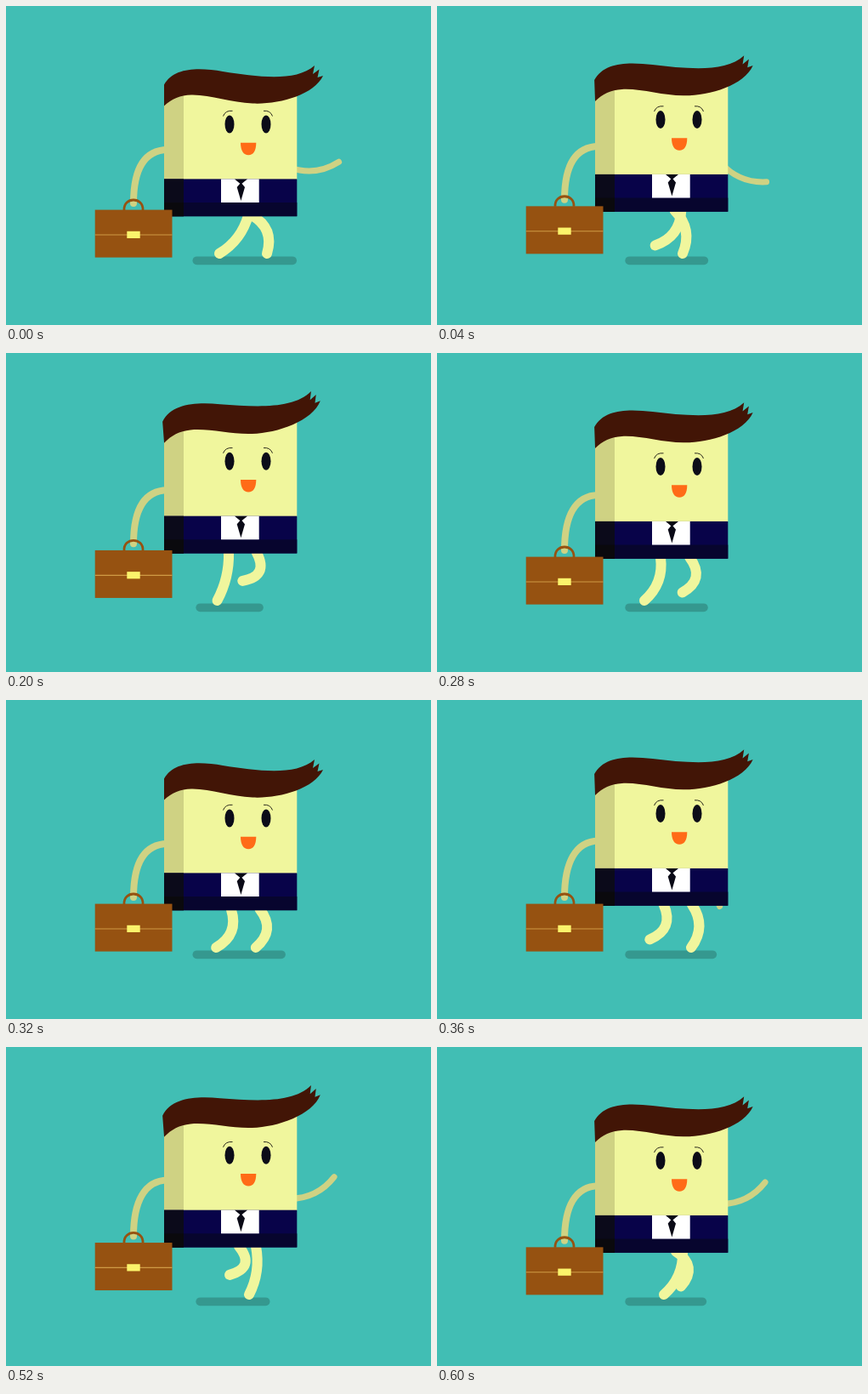
An HTML page for the animation above (0.64 s loop, 500 by 375 pixels).

```html
<!DOCTYPE html>
<html lang="en">
<head>
<meta charset="utf-8">
<title>Walking businessman</title>
<style>
  html, body { margin: 0; width: 100%; height: 100%; overflow: hidden; background: #41beb4; }
  svg { display: block; width: 100vw; height: 100vh; }
  .limb { fill: none; stroke-linecap: round; }
  .leg { stroke: #f0f69d; stroke-width: 12; }
  .arm { stroke: #cfd283; stroke-width: 8; }
</style>
</head>
<body>
<svg viewBox="0 0 500 375">
  <rect width="500" height="375" fill="#41beb4"/>
  <rect id="shadow" y="294.4" height="9.8" rx="4.9" fill="#35988f"/>
  <path id="legA" class="limb leg"/>
  <path id="legB" class="limb leg"/>
  <path id="armBack" class="limb arm"/>
  <path id="armFront" class="limb arm" style="stroke-width:7"/>

  <g id="body">
    <rect x="186" y="92" width="156.3" height="112" fill="#f0f69d"/>
    <rect x="186" y="92" width="23" height="112" fill="#cfd283"/>
    <rect x="186" y="203.4" width="156.3" height="43.8" fill="#080349"/>
    <rect x="186" y="231" width="156.3" height="16.2" fill="#07052e"/>
    <rect x="186" y="203.4" width="23" height="43.8" fill="#0b0a1a"/>
    <rect x="186" y="231" width="23" height="16.2" fill="#0a090d"/>
    <rect x="253" y="203.4" width="44.7" height="27.6" fill="#fff"/>
    <path d="M269 203.4H284L277.5 208.7L281 213L276.4 229L271.7 213L275.3 208.7Z" fill="#0a0a16"/>
    <g fill="#0c0c18">
      <ellipse cx="263" cy="139" rx="5.5" ry="10.5"/>
      <ellipse cx="306" cy="139" rx="5.5" ry="10.5"/>
    </g>
    <path d="M255.5 129.5Q258 122.5 266.5 123.3M303 123.3Q311 122.5 313.5 129.5" fill="none" stroke="#2b2a1c"/>
    <path d="M276 160.7H294.3C294.3 170 291 175.3 285.2 175.3C279.5 175.3 276 170 276 160.7Z" fill="#ff6b17"/>
    <path id="hair" fill="#421506" d="M186 117.5V92.5C198 71.5 228 72.5 255 77C295 83 340 90 363 70L361 80L368.5 74.5L366.5 84L373 82C362 105 320 116 290 114.5C265 113.5 240 104 218 104.5C205 105 195 109 186 117.5Z"/>
  </g>

  <g id="bag">
    <path d="M139 240C138 224 162 224 161 240" fill="none" stroke="#965211" stroke-width="2.8"/>
    <rect x="104.7" y="239.6" width="90.8" height="56" fill="#965211"/>
    <path d="M104.7 269H195.5" stroke="#cf9a45" stroke-width="1.2"/>
    <rect x="142.3" y="264.8" width="15.4" height="8.2" fill="#fbf36b"/>
  </g>
</svg>
<script>
const STEP = 40, STEPS = 16, GROUND = 291;
const LEG = 60, ARM = 58;
const el = id => document.getElementById(id);
const { sin, cos, max, sqrt, hypot, PI } = Math;

// Key poses: step, hip x, foot x.
const strideA = [[0, 289, 307], [3, 261, 253], [7, 263, 244], [13, 274, 263], [15, 281, 287]];
const strideB = [[0, 285, 251], [3, 292, 268], [9, 300, 299], [13, 294, 286], [15, 289, 267]];

function pose(keys, step) {
  const n = keys.findLastIndex(k => k[0] <= step);
  const from = keys[n], to = keys[n + 1] || keys[0];
  const end = n + 1 < keys.length ? to[0] : STEPS;
  const part = (step - from[0]) / (end - from[0]);
  return [1, 2].map(i => from[i] + (to[i] - from[i]) * part);
}

function curve(id, type, ...p) {
  el(id).setAttribute('d', `M${p[0]} ${p[1]}${type}${p.slice(2).join(' ')}`);
}

function move(id, value) {
  el(id).setAttribute('transform', value);
}

// The closer the foot comes to the hip, the further the knee bends forward.
function drawLeg(id, hipX, hipY, footX, footY) {
  const dx = footX - hipX, dy = footY - hipY, d = hypot(dx, dy);
  const bend = 0.55 * sqrt(max(0, LEG * LEG - d * d)) / d;
  const kneeX = (hipX + footX) / 2 + dy * bend;
  const kneeY = (hipY + footY) / 2 - dx * bend;
  curve(id, 'Q', hipX, hipY, kneeX, kneeY, footX, footY);
}

function drawFrontArm(turn, up) {
  const raise = (90 * cos(turn + PI / 4) - 57) * PI / 180;
  const x = 334, y = 190 - up, dx = ARM * cos(raise), dy = -ARM * sin(raise);
  const sag = 14;
  curve('armFront', 'Q', x, y,
    x + dx / 2 + sag * sin(raise), y + dy / 2 + sag * cos(raise), x + dx, y + dy);
}

function draw(ms) {
  const step = Math.floor(ms / STEP) % STEPS;
  const turn = 2 * PI * step / STEPS;

  // Two parabolic hops per loop; the bag's second swing comes a step late.
  const hop = (step % 8 - 4) / 4;
  const up = 12.5 * (1 - hop * hop);
  const lift = max(0, 9.8 * sin(PI * (step % 9) / 7));

  move('body', `translate(0 ${-up})`);
  move('hair', `rotate(${-0.37 * up} 186 117)`);
  move('bag', `translate(0 ${-lift})`);

  const [hipA, footA] = pose(strideA, step);
  const [hipB, footB] = pose(strideB, step);
  const hipY = 246 - up;
  drawLeg('legA', hipA, hipY, footA, GROUND - 25 * max(0, -sin(turn)));
  drawLeg('legB', hipB, hipY, footB, GROUND - 25 * max(0, sin(turn)));

  const left = 219.5 + up / 3;
  const right = max(footA, footB) + 35 - 0.9 * up;
  el('shadow').setAttribute('x', left);
  el('shadow').setAttribute('width', right - left);

  drawFrontArm(turn, up);
  const shoulder = 169 - (up + lift) / 2 + 2 * sin(turn);
  curve('armBack', 'C', 190, shoulder, 163, shoulder + 0.5, 150, 191 - lift, 150, 232 - lift);
}

const start = performance.now();
function tick() {
  draw(performance.now() - start);
  requestAnimationFrame(tick);
}
tick();
</script>
</body>
</html>
```
